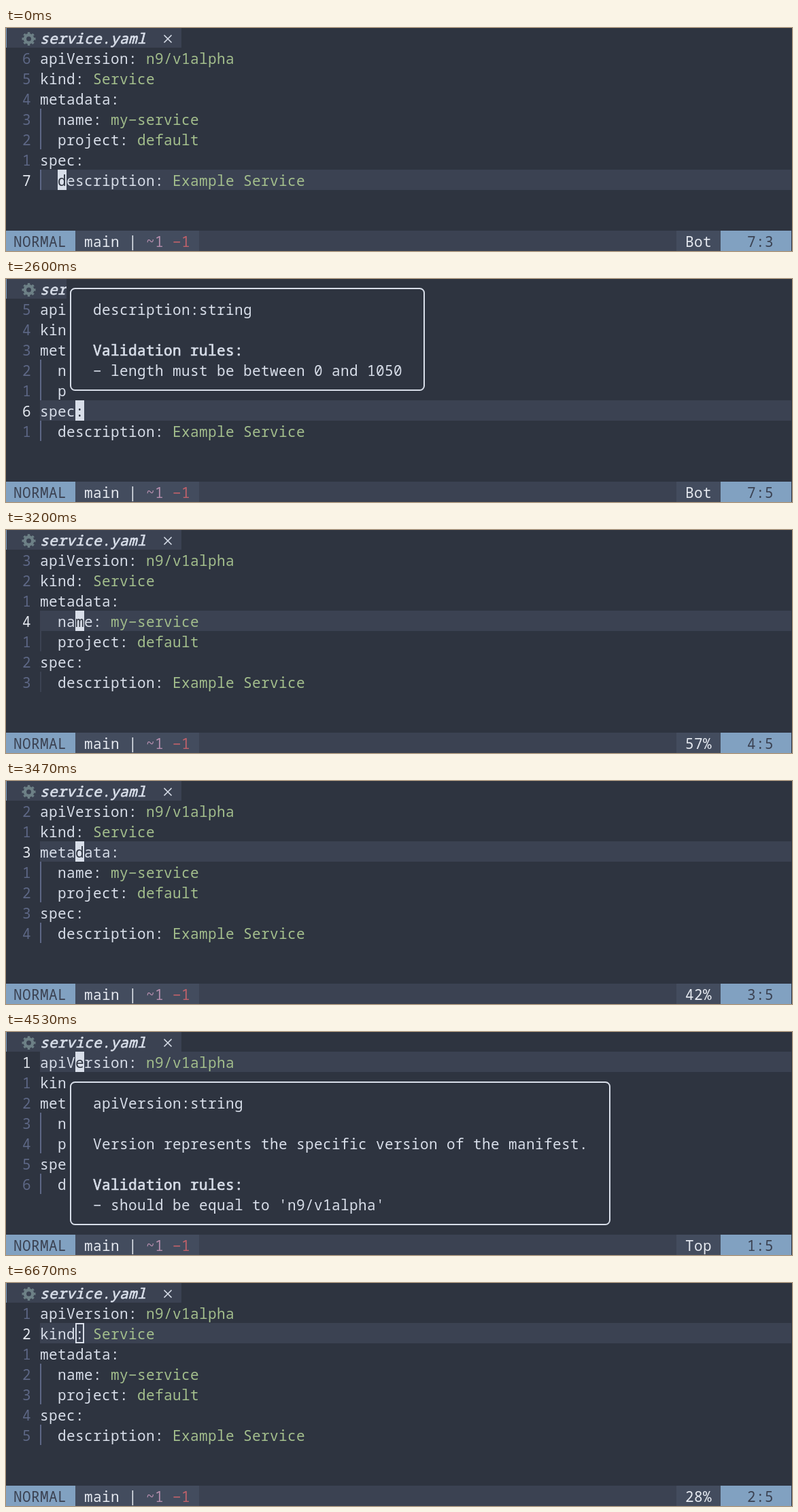
Write an HTML page that moves like this. It is 1156 px wide and 329 px high and loops after 6.73 s.

```html
<!DOCTYPE html>
<html lang="en">
<head>
<meta charset="utf-8">
<title>YAML hover in an editor</title>
<style>
  html, body { margin: 0; height: 100%; overflow: hidden; background: #2e3440; }
  svg { display: block; width: 1156px; height: 329px; }
  text { font: 21px "Noto Sans Mono", "DejaVu Sans Mono", monospace; letter-spacing: .4px; white-space: pre; }
  .medium { stroke: #d8dee9; stroke-width: .7px; }
  .title { font-style: italic; }
</style>
</head>
<body>
<svg id="stage" viewBox="0 0 1156 329"></svg>
<script>
const LOOP = 6730, CELL = 13, ROW = 30;
const BG = '#2e3440', BAR = '#3b4252', PANEL = '#434c5e', BLUE = '#81a1c1';
const FG = '#d8dee9', BRIGHT = '#e5e9f0', GREEN = '#a3be8c', MUTED = '#5d6785';

const lines = [
  'apiVersion: n9/v1alpha', 'kind: Service', 'metadata:',
  '  name: my-service', '  project: default', 'spec:',
  '  description: Example Service'
];

// Cursor moves; ticks are fifteenths of a second
const moves = [
  { tick: -9, row: 7, col: 2 }, { tick: 5, row: 7, col: 3 }, { tick: 7, row: 7, col: 4 },
  { tick: 39, row: 6, col: 4 }, { tick: 44, row: 5, col: 4 }, { tick: 47, row: 4, col: 4 },
  { tick: 50, row: 3, col: 4 }, { tick: 53, row: 2, col: 4 }, { tick: 56, row: 1, col: 4 },
  { tick: 91, row: 2, col: 4 }
];

const popups = [
  { from: 17, to: 40, row: 0, right: 47, text: [
    'description:string', '', 'Validation rules:', '- length must be between 0 and 1050'] },
  { from: 67, to: 92, row: 2, right: 68, text: [
    'apiVersion:string', '', 'Version represents the specific version of the manifest.', '',
    'Validation rules:', "- should be equal to 'n9/v1alpha'"] }
];
const POPUP_LEFT = 7, TEXT_COL = 4;

const x = col => col * CELL - 2;
const y = row => row * ROW - 1;
const rect = (col, row, cols, rows, fill) =>
  `<rect x="${x(col)}" y="${y(row)}" width="${cols * CELL}" height="${rows * ROW}" fill="${fill}"/>`;
// Hyphens are set as the wider minus glyph
const text = (col, row, str, fill, cls = '') =>
  `<text x="${x(col)}" y="${y(row) + 24}" fill="${fill}" class="${cls}">${String(str).replace('-', '\u2212')}</text>`;

const cursorAt = tick => moves.findLast(m => m.tick <= tick);

function tab() {
  return rect(0, 0, 20, 1, BAR) +
    `<rect width="1" height="29" fill="${BLUE}"/>
    <g fill="none" stroke="#6d8086">
      <circle cx="33.5" cy="16" r="5.7" stroke-width="4.4"/>
      <circle cx="33.5" cy="16" r="8.5" stroke-width="3" pathLength="16" stroke-dasharray="1" stroke-dashoffset=".5"/>
    </g>
    <path d="M232.5 10.5l11 11m0-11l-11 11" stroke="${FG}" stroke-width="1.6"/>` +
    text(4, 0, 'service.yaml', FG, 'title medium');
}

function line(str, i, cursorRow, guide) {
  const row = i + 1, current = row === cursorRow;
  const split = str.indexOf(':') + 1;
  let out = current ? rect(TEXT_COL, row, 85, 1, BAR) : '';
  out += text(2, row, current ? row : Math.abs(row - cursorRow), current ? BRIGHT : MUTED);
  if (str[0] === ' ') out += `<rect x="50" y="${y(row)}" width="2" height="${ROW}" fill="${guide}"/>`;
  return out + text(TEXT_COL, row, str.slice(0, split), FG) +
    text(TEXT_COL + split, row, str.slice(split), GREEN);
}

function popup({ from, row, right, text: content }, tick) {
  const rows = content.length + 2, cols = right - POPUP_LEFT;
  return rect(POPUP_LEFT, row, cols + 1, rows, BG) +
    `<rect x="${x(POPUP_LEFT) + 6}" y="${y(row) + 15}" width="${cols * CELL}" height="${(rows - 1) * ROW}"
      rx="6.5" fill="none" stroke="${FG}" stroke-width="2"/>` +
    content.map((str, i) => text(10, row + 1 + i, str, FG,
      str.startsWith('Validation') && tick > from ? 'medium' : '')).join('');
}

function statusBar({ row, col }) {
  const place = row === 1 ? 'Top' : row === 7 ? 'Bot' : Math.floor(row / 7 * 100) + '%';
  return rect(0, 10, 89, 1, BAR) + rect(0, 10, 8, 1, BLUE) + rect(8, 10, 14, 1, PANEL) +
    rect(76, 10, 5, 1, PANEL) + rect(81, 10, 8, 1, BLUE) +
    text(1, 10, 'NORMAL', BAR) + text(9, 10, 'main |', BRIGHT) +
    text(16, 10, '~1', '#b48ead') + text(19, 10, '-1', '#bf616a') +
    text(77, 10, place, BRIGHT) + text(84, 10, `${row}:${col + 1}`, BAR);
}

function cursor({ row, col }, hollow, onBorder) {
  const left = TEXT_COL + col;
  if (hollow) return `<rect x="${x(left) + 1}" y="${y(row) + 1}" width="${CELL - 2}" height="${ROW - 2}"
    fill="none" stroke="${FG}" stroke-width="2"/>`;
  return rect(left, row, 1, 1, FG) + (onBorder
    ? `<rect x="${x(left)}" y="${y(row) + 14}" width="${CELL}" height="2" fill="${BG}"/>`
    : text(left, row, lines[row - 1][col], BG));
}

function scene(tick) {
  const now = cursorAt(tick), shown = cursorAt(tick - 1), scope = cursorAt(tick - 2);
  // Status and indent guides trail the cursor
  const guide = shown.row !== scope.row || shown.row === 6 ? BAR : MUTED;
  const open = popups.find(p => tick >= p.from && tick < p.to);
  return tab() + lines.map((str, i) => line(str, i, now.row, guide)).join('') +
    (open ? popup(open, tick) : '') + statusBar(shown) +
    cursor(now, tick >= 100, open && open.row === now.row);
}

const stage = document.getElementById('stage');
const start = performance.now();
let lastTick = -1;

function draw() {
  const time = (performance.now() - start) % LOOP;
  const tick = Math.floor((Math.floor(time / 10) + 0.4) * 0.15);
  if (tick !== lastTick) stage.innerHTML = scene(lastTick = tick);
  requestAnimationFrame(draw);
}
draw();
</script>
</body>
</html>
```
